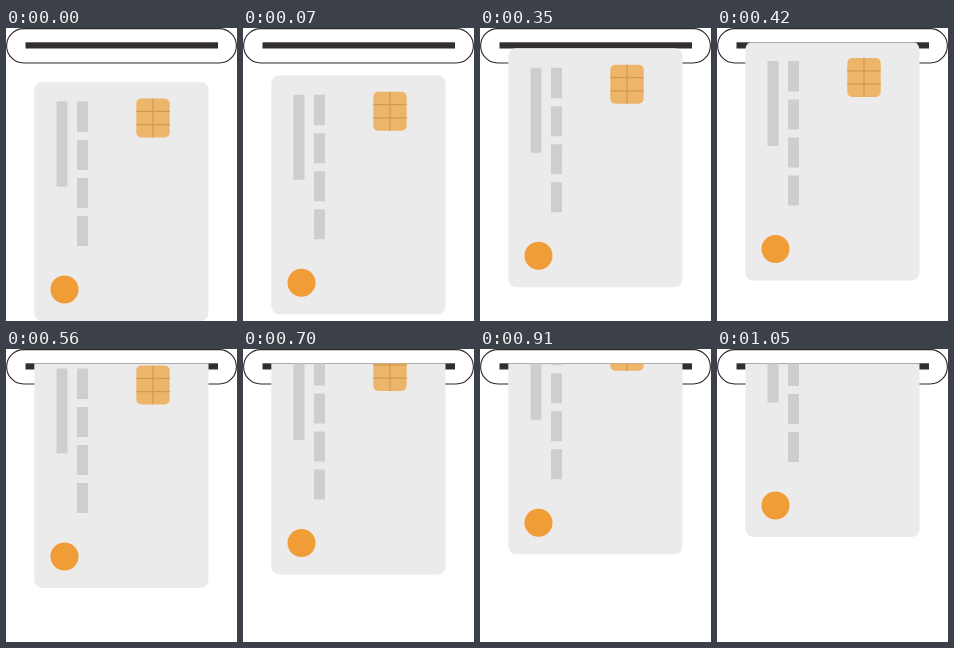
These frames come from a looping animation (231 px wide and 293 px high, 1.5 s). An HTML page:

```html
<!DOCTYPE html>
<html lang="en">
<head>
<meta charset="utf-8">
<title>Card entering a slot</title>
<style>
html, body { margin: 0; width: 100%; height: 100%; overflow: hidden; background: #fff; }
svg { display: block; width: 231px; height: 293px; }
</style>
</head>
<body>
<svg viewBox="0 0 231 293">
  <clipPath id="below"><rect y="14.5" width="231" height="279"/></clipPath>
  <rect x=".6" y=".6" width="229.8" height="34.4" rx="17.2" fill="#fff" stroke="#2b2829" stroke-width="1.1"/>
  <rect x="19.5" y="14.3" width="192.5" height="6.2" fill="#332e2e"/>
  <g clip-path="url(#below)">
    <g id="card">
      <rect x="28.3" y="54" width="174.2" height="239" rx="8" fill="#ebebeb"/>
      <path fill="#cdced0" d="M50.5 73.5h11v85h-11zM71 73.5h11v30.5h-11zM71 112h11v30h-11zM71 150h11v30h-11zM71 188h11v30h-11z"/>
      <rect x="130.3" y="70.5" width="33.4" height="39" rx="5" fill="#edb56a"/>
      <path stroke="#d29a4e" stroke-width="1.2" d="M147 70.5v39M130.3 83.3h33.4M130.3 96.7h33.4"/>
      <circle cx="58.5" cy="261.5" r="14" fill="#f09d38"/>
    </g>
  </g>
</svg>
<script>
const card = document.getElementById('card');
const LOOP = 1500, STEP = 70, LAST = 15;
const start = performance.now();

// Even steps upwards, then a slightly longer final push and a hold.
function lift(ms) {
  const step = Math.floor(ms / STEP);
  return step < LAST ? step * 6.75 : 105;
}

function draw(now) {
  const ms = Math.max(0, now - start) % LOOP;
  card.setAttribute('transform', `translate(0 ${-lift(ms)})`);
  requestAnimationFrame(draw);
}
draw(start);
</script>
</body>
</html>
```
